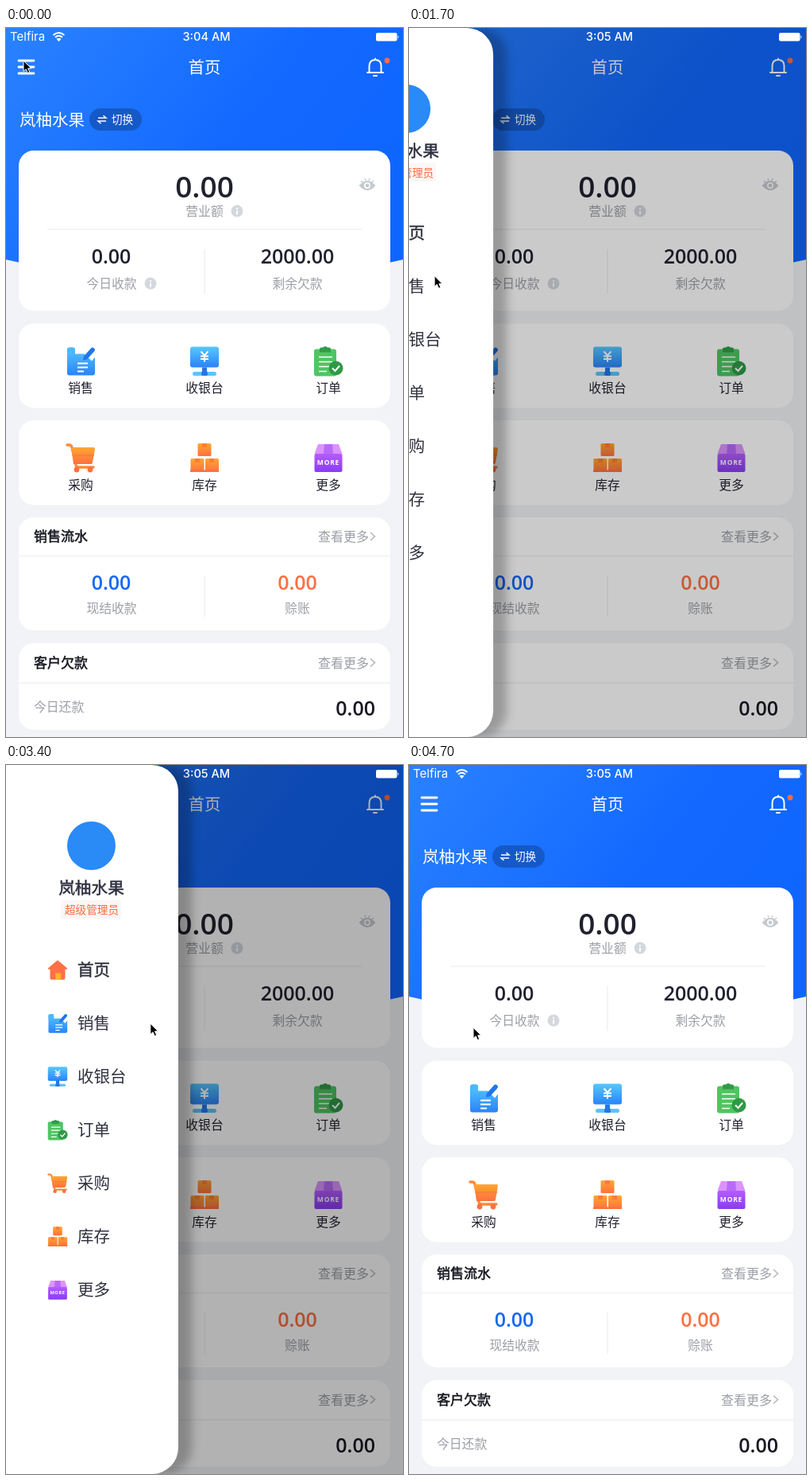
Animation, 500 px wide and 891 px high, one loop 4800 ms. Source, as an HTML page:

```html
<!DOCTYPE html>
<html lang="zh-CN">
<head>
<meta charset="utf-8">
<title>首页</title>
<style>
html, body { margin: 0; width: 100%; height: 100%; overflow: hidden; background: #f1f3f6; }
svg { display: block; width: 100vw; height: 100vh; }
text { font-family: "Noto Sans CJK SC", "Noto Sans CJK", "Noto Sans", sans-serif; }
.num { font-family: "Open Sans", "Noto Sans", sans-serif; font-weight: 600; }
.sys { font-family: Inter, Roboto, sans-serif; }
.mid { stroke-width: .5px; }
#drawer rect.panel { filter: drop-shadow(17px 0 6px rgba(0,0,0,.24)); }
</style>
</head>
<body>
<svg viewBox="0 0 500 891" preserveAspectRatio="none">
  <defs>
    <linearGradient id="head" x1="0" y1="0" x2="1" y2=".5">
      <stop stop-color="#2a82ff"/><stop offset=".65" stop-color="#1268ff"/><stop offset="1" stop-color="#0f66ff"/>
    </linearGradient>
    <linearGradient id="blue" x2="0" y2="1"><stop stop-color="#56c8ff"/><stop offset="1" stop-color="#2b83f8"/></linearGradient>
    <linearGradient id="orange" x2="0" y2="1"><stop stop-color="#ffa72f"/><stop offset="1" stop-color="#ff7040"/></linearGradient>
    <linearGradient id="purple" x2="0" y2="1"><stop stop-color="#b45cff"/><stop offset="1" stop-color="#8a3cf2"/></linearGradient>

    <g id="sales">
      <path d="M-17-14q0-3 3-3h4q3 0 3 3v5H5L14 0l4-5V15q0 3-3 3H-14q-3 0-3-3z" fill="url(#blue)"/>
      <path d="M-17-14q0-3 3-3h4q3 0 3 3v6H-17z" fill="#4cb8ff"/>
      <path d="M3-1 4-6 13-16q2-2 4 0t0 4L8-2z" fill="#1f76ee"/>
      <path d="M-4 3H9M-4 8H9M-4 13H4" stroke="#fff" stroke-width="1.8"/>
    </g>
    <g id="cash">
      <rect x="-3" y="8" width="6" height="9" fill="#2576e8"/>
      <rect x="-15" y="13.5" width="30" height="5" rx="2.5" fill="#5cc4ff"/>
      <rect x="-4" y="13" width="8" height="5.5" rx="2" fill="#2576e8"/>
      <rect x="-18" y="-18" width="36" height="26" rx="3" fill="url(#blue)"/>
      <path d="M-4.500-12 0-7 4.500-12M0-7V1M-5-6H5M-5-2.500H5" fill="none" stroke="#fff" stroke-width="2"/>
    </g>
    <g id="order">
      <rect x="-18" y="-15" width="28" height="34" rx="3" fill="#4fc562"/>
      <path d="M-11-11v-4q0-2 2-2h2q3-3 6 0h2q2 0 2 2v4z" fill="#319b48"/>
      <path d="M-12-5H5M-12 1H5M-12 7H2M-12 13H-2" stroke="#fff" stroke-width="1.7"/>
      <circle cx="9.5" cy="9" r="9" fill="#2f9a46"/>
      <path d="M5 9l3.5 3.5L14 6" fill="none" stroke="#fff" stroke-width="2"/>
    </g>
    <g id="cart">
      <path d="M-17-16h3q2 0 3 3l5 22q0 3 4 3H16" fill="none" stroke="#ff8a37" stroke-width="3.4" stroke-linecap="round"/>
      <path d="M-12-13H16q2 0 2 2L15 6q0 2-3 2H-9z" fill="url(#orange)"/>
      <path d="M-10-3H17M-9 3H15" stroke="#ff7a3e" stroke-width="1.5"/>
      <circle cx="-5" cy="15" r="3.4" fill="#ff7040"/><circle cx="12" cy="15" r="3.4" fill="#ff7040"/>
    </g>
    <g id="stock" fill="url(#orange)">
      <rect x="-8.5" y="-18" width="17" height="16" rx="1.5"/>
      <rect x="-17.5" y="1" width="17" height="17" rx="1.5"/>
      <rect x="1" y="1" width="17" height="17" rx="1.5"/>
      <path d="M-3-18h6v5h-6zM-12 1h6v5h-6zM6 1h6v5h-6z" fill="#ff7c35"/>
      <path d="M-18 16.8H18" stroke="#ff7040" stroke-width="2.6"/>
    </g>
    <g id="more">
      <path d="M-13-17H13L17.5-5h-35z" fill="#dc93ff"/>
      <rect x="-17.5" y="-5" width="35" height="23" rx="2" fill="url(#purple)"/>
      <path d="M-5-17H5L6-5H-6z" fill="#b86af8"/>
      <text class="num" y="8.5" font-size="8.5" letter-spacing=".8" text-anchor="middle" fill="#fff" style="font-weight:700">MORE</text>
    </g>
    <g id="home">
      <path d="M0-18 18-3q0 2-2 2h-2v16q0 3-3 3h-22q-3 0-3-3v-16h-2q-2 0-2-2z" fill="#ff7047"/>
      <rect x="-4" y="6" width="10" height="12" fill="#ffb52e"/>
    </g>
    <g id="info">
      <circle r="7.5" fill="#d3d8de"/>
      <path d="M0-4v2M0-.5V4.5" stroke="#fff" stroke-width="2"/>
    </g>
  </defs>

  <g id="page">
    <rect width="500" height="891" fill="#f1f3f6"/>
    <path d="M0 0H500V291Q250 350 0 291z" fill="url(#head)"/>
    <path d="M16 41H35M16 49H35M16 57H35" stroke="#fff" stroke-width="2.8" stroke-linecap="round"/>
    <path d="M455 56H475M457.5 56V48q0-8 7.5-8t7.5 8v8M465 38.5v1M463 60h4" fill="none" stroke="#fff"
      stroke-width="2" stroke-linecap="round" stroke-linejoin="round"/>
    <circle cx="480" cy="41" r="3.4" fill="#ff6c40"/>
    <rect x="105" y="101" width="66" height="28" rx="14" fill="#1559c8"/>
    <path d="M116 113H126L122.5 110M126 117H116l3.5 3" fill="none" stroke="#fff" stroke-width="1.5"/>
  </g>
  <rect id="dim" width="500" height="891"/>
  <g id="status">
    <path d="M59.5 9q7-6 14 0M62 11.8q4.500-4 9 0" fill="none" stroke="#fff" stroke-width="1.9"/>
    <path d="M66.5 17l-3-3.2q3-2 6 0z" fill="#fff"/>
    <rect x="466" y="6" width="26.5" height="10.5" rx="2" fill="#fff"/>
    <path d="M493.5 9q2 2.3 0 4.5z" fill="#fff"/>
  </g>
  <g id="drawer">
    <rect class="panel" x="-320" width="320" height="891" rx="33" fill="#fff"/>
    <circle cx="-109.5" cy="101.5" r="30.5" fill="#2a8af6"/>
    <rect x="-148" y="170" width="76" height="23" rx="3" fill="#fcf6f5"/>
  </g>
  <path id="cursor" d="M0 0V13.5L3.2 10.7 5.4 15.6 7.8 14.5 5.7 9.8H9.8z" stroke="#fff"/>
</svg>
<script>
const $ = id => document.getElementById(id);
const add = (id, markup) => $(id).insertAdjacentHTML("beforeend", markup);

// Text centred vertically on y
const text = (x, y, size, fill, str, anchor = "middle", extra = "") =>
  `<text x="${x}" y="${y + size * .38}" font-size="${size}" fill="${fill}" text-anchor="${anchor}" ${extra}>${str}</text>`;
const mid = (x, y, size, fill, str, anchor) =>
  text(x, y, size, fill, str, anchor, `class="mid" stroke="${fill}"`);
const num = (x, y, size, fill, str, anchor) =>
  text(x, y - size * .02, size, fill, str, anchor, 'class="num"');
const card = (y, h) => `<rect x="16" y="${y}" width="468" height="${h}" rx="19" fill="#fff"/>`;
const rule = d => `<path d="${d}" stroke="#eff1f3" stroke-width="1.5"/>`;
const icon = (id, x, y, scale = 1) => `<use href="#${id}" transform="translate(${x} ${y}) scale(${scale})"/>`;

const shop = "岚柚水果", ink = "#20212f", gray = "#9b9fa6";
const items = [["sales", "销售"], ["cash", "收银台"], ["order", "订单"],
               ["cart", "采购"], ["stock", "库存"], ["more", "更多"]];
const section = (y, title) =>
  mid(35, y, 17, "#15161f", title, "start") +
  text(393, y, 16, gray, "查看更多", "start") +
  `<path d="M459 ${y - 5}l5.5 5-5.5 5" fill="none" stroke="#b5b9bf" stroke-width="1.6"/>`;

add("page",
  text(250, 49, 20.4, "#fff", "首页") +
  text(17, 115, 20.5, "#fff", shop, "start") +
  text(146.5, 115, 13.6, "#fff", "切换") +
  card(154, 201.5) + card(371.5, 106) + card(493, 106.5) + card(615, 142) + card(773, 109) +
  rule("M52 253H448M250 278V334M16 663.5H484M250 688V740M16 823H484") +
  num(250, 199.5, 37, ink, "0.00") +
  text(250, 230, 15.8, gray, "营业额") + icon("info", 291, 230) +
  num(132.5, 287, 25, ink, "0.00") + num(367, 287, 25, ink, "2000.00") +
  text(133, 321, 15.8, gray, "今日收款") + icon("info", 182, 321) +
  text(367, 321, 15.8, gray, "剩余欠款") +
  `<g fill="none" stroke="#c6cad0" stroke-width="2">
     <path d="M446 198q9-10 18 0-9 10-18 0z" fill="#c6cad0"/>
     <path d="M447 192l2 2M452 189l1 2.5M458 189l-1 2.5M463 192l-2 2" stroke-width="1.5"/>
     <circle cx="455" cy="198" r="3.2" stroke="#fff" stroke-width="1.6"/></g>` +
  items.map(([id, label], i) => {
    const x = 94 + i % 3 * 156, y = i < 3 ? 418.5 : 540;
    return icon(id, x, y) + text(x, y + 33.5, 15.8, ink, label);
  }).join("") +
  section(639, "销售流水") + section(797.5, "客户欠款") +
  num(132.5, 697, 25, "#1668f5", "0.00") + num(367, 697, 25, "#fb7043", "0.00") +
  text(133, 729, 15.8, gray, "现结收款") + text(367, 729, 15.8, gray, "赊账") +
  text(35, 853, 15.8, gray, "今日还款", "start") +
  num(465, 855, 25, "#171822", "0.00", "end"));

add("status",
  text(5, 10.7, 15, "#fff", "Telfira", "start", 'class="sys"') +
  text(252.5, 10.7, 14.6, "#fff", "3:04 AM", "middle", 'class="sys" font-weight="500" id="clock"'));

add("drawer",
  mid(-109.5, 154.5, 20.7, "#2e3040", shop) +
  text(-109, 181.5, 13.6, "#fb6a3c", "超级管理员") +
  [["home", "首页"], ...items].map(([id, label], i) =>
    icon(id, -152, 257.5 + i * 67, .68) +
    (i ? text : mid)(-127, 257.5 + i * 67, 20.5, "#30323f", label, "start")
  ).join(""));

const OPEN = 217, SLIDE = 300;

// Pointer path: [ms, x, y], eased between the stops
const path = [[0, 22, 41], [500, 22, 41], [870, 147, 299], [1300, 147, 299], [1750, 28, 312],
  [2750, 250, 322], [3100, 250, 322], [3550, 158, 326], [3600, 158, 326], [3830, 81, 330], [4800, 81, 330]];

function pointer(t) {
  const i = path.findIndex(k => k[0] > t), [t0, x0, y0] = path[i - 1], [t1, x1, y1] = path[i];
  const p = (t - t0) / (t1 - t0), e = p * p * (3 - 2 * p);
  return [x0 + (x1 - x0) * e, y0 + (y1 - y0) * e];
}

// Release or tap: slide from one edge to another, decelerating
function slide(from, to, t) {
  const p = Math.min(1, Math.max(0, t / SLIDE));
  return to + (from - to) * (1 - p) ** 3;
}

// While held, the edge follows the pointer and resists beyond the open position
function drag(grabX, t) {
  const d = pointer(t)[0] - grabX;
  return OPEN + (d > 0 ? d * .145 : d);
}

function edgeAt(t) {
  const tap = 310, grab = 1300, drop = 2900, regrab = 3600, close = 4150;
  if (t < grab) return slide(0, OPEN, t - tap);
  if (t < drop) return drag(143, t);
  if (t < regrab) return slide(drag(143, drop), OPEN, t - drop);
  if (t < close) return drag(158, t);
  return slide(drag(158, close), 0, t - close);
}

function draw(now) {
  const t = Math.floor(now % 4800 / 100) * 100;
  const edge = edgeAt(t);
  $("drawer").setAttribute("transform", `translate(${edge})`);
  $("drawer").style.display = edge > 0 ? "" : "none";
  $("dim").setAttribute("opacity", .3 * Math.sqrt(Math.min(1, edge / OPEN)));
  $("cursor").setAttribute("transform", `translate(${pointer(t)})`);
  $("clock").textContent = t < 900 ? "3:04 AM" : "3:05 AM";
}

const start = performance.now();
function loop() {
  draw(performance.now() - start);
  requestAnimationFrame(loop);
}
loop();
</script>
</body>
</html>
```
